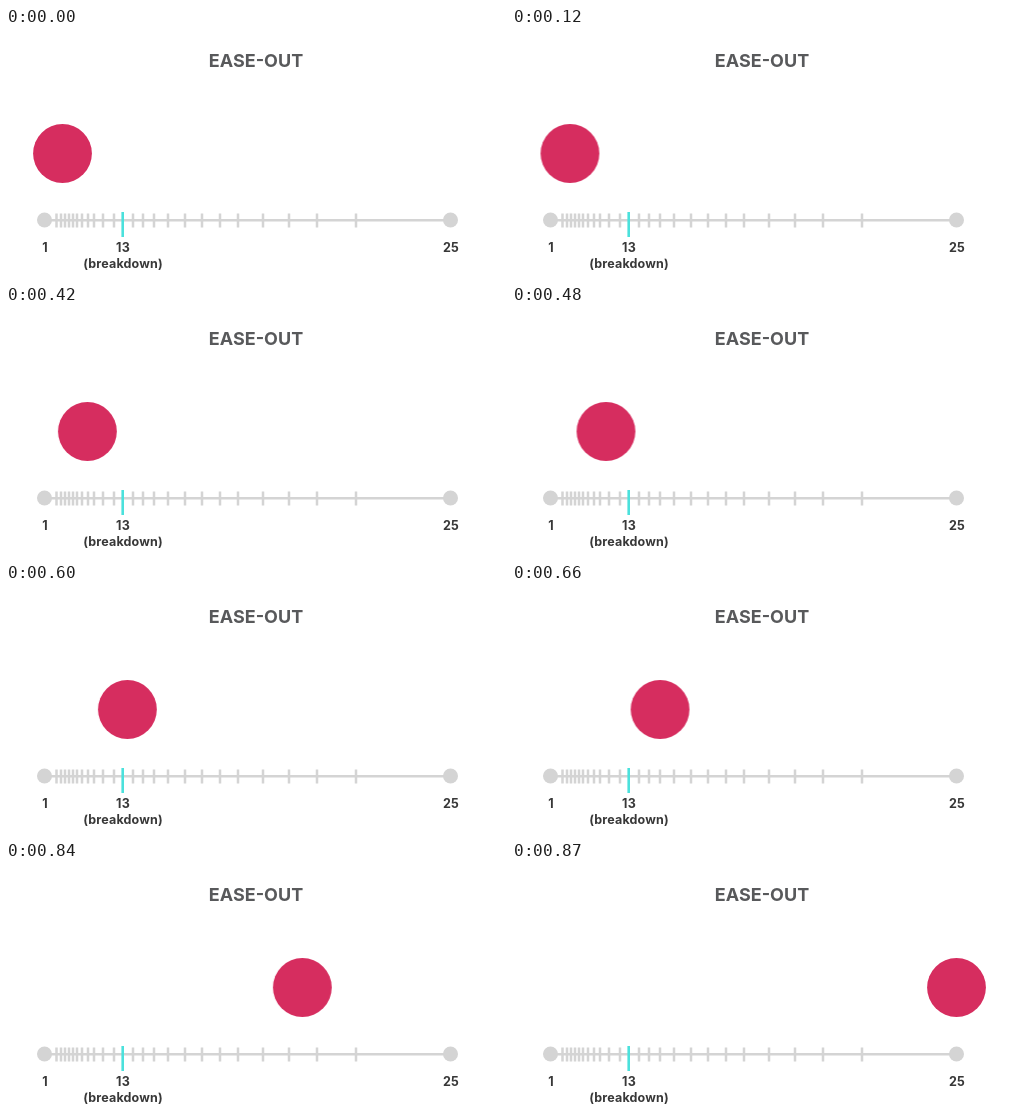
An HTML page for the animation above (930 ms loop, 500x250 px).

```html
<!DOCTYPE html>
<html lang="en">
<head>
<meta charset="utf-8">
<title>Ease-out</title>
<style>
  html, body { margin: 0; width: 100%; height: 100%; overflow: hidden; background: #fff; }
  svg { display: block; width: 500px; height: 250px; }
  text { font-family: Inter, "Open Sans", sans-serif; font-weight: 700; text-anchor: middle; }
  .title { font-size: 18px; fill: #58595b; }
  .label { font-size: 12.5px; fill: #383838; letter-spacing: .15px; }
  .track { stroke: #d4d4d4; stroke-width: 2.5; fill: none; }
  .dot { fill: #d4d4d4; }
  .mark { stroke: #4be1dc; stroke-width: 2.6; }
</style>
</head>
<body>
<svg viewBox="0 0 500 250">
  <text class="title" x="250" y="39">EASE-OUT</text>
  <path class="track" d="M38.5 192.3H444.5"/>
  <path class="track" id="ticks"/>
  <circle class="dot" cx="38.5" cy="192" r="7.5"/>
  <circle class="dot" cx="444.5" cy="192" r="7.5"/>
  <path class="mark" d="M116.7 184V209"/>
  <text class="label" x="39" y="224">1</text>
  <text class="label" x="117" y="224">13</text>
  <text class="label" x="117" y="240">(breakdown)</text>
  <text class="label" x="445" y="224">25</text>
  <circle id="ball" cx="56.5" cy="125.5" r="29.4" fill="#d62d5f"/>
</svg>
<script>
  const LOOP = 930, TICK = 30, LAST = 24, TRAVEL = 388;

  const ticks = [50.5, 55, 59, 63, 67, 71, 76, 82, 88, 97, 108,
    127, 137, 148, 162, 179, 196, 214, 232, 257, 283, 311, 350];
  document.getElementById('ticks')
    .setAttribute('d', ticks.map(x => `M${x} 185.5V199.5`).join(''));

  // Bezier ease: slow start, very steep finish. Progress is s squared.
  function ease(u) {
    let lo = 0, hi = 1;
    for (let k = 0; k < 40; k++) {
      const s = (lo + hi) / 2;
      const x = 2.112 * s * (1 - s) ** 2 + 3 * s * s - 2 * s ** 3;
      if (x < u) lo = s; else hi = s;
    }
    return hi * hi;
  }

  // Every fifth pose, and the last one, holds for two ticks.
  const startOf = i => TICK * (i + Math.ceil(i / 5));

  const steps = [];
  for (let i = 0; i <= LAST; i++) {
    steps.push({
      offset: startOf(i) / LOOP,
      transform: `translateX(${(TRAVEL * ease(i / LAST)).toFixed(2)}px)`,
      easing: 'step-end'
    });
  }
  steps.push({ offset: 1, transform: `translateX(${TRAVEL}px)` });

  document.getElementById('ball')
    .animate(steps, { duration: LOOP, iterations: Infinity });
</script>
</body>
</html>
```
